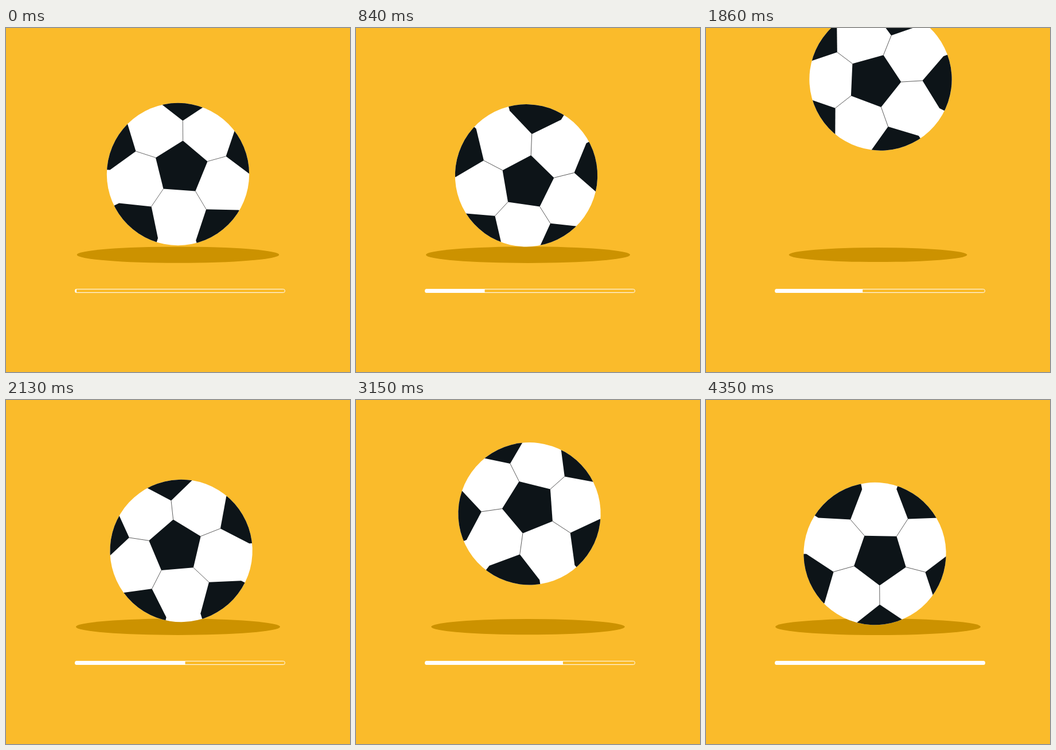
Animation of 600 by 600 pixels, one loop 4380 ms. Source, as an HTML page with a canvas:

```html
<!DOCTYPE html>
<html lang="en">
<head>
<meta charset="utf-8">
<title>Bouncing ball loader</title>
<style>
  html, body { margin: 0; width: 100%; height: 100%; overflow: hidden; background: #fabb2b; }
  canvas { display: block; width: 600px; height: 600px; }
</style>
</head>
<body>
<canvas id="stage" width="600" height="600"></canvas>
<script>
const ctx = document.getElementById('stage').getContext('2d');
const LOOP = 4380, STEP = 30, CYCLE = 1500, TAU = Math.PI * 2;
const GROUND = 276.5, RADIUS = 124.2, PIVOT = 5.7;
const YELLOW = '#fabb2b', SHADE = '#cc9200', BLACK = '#0d1418', WHITE = '#fff';

// Smooth 0..1 ramp that starts at `from` and lasts `span` ms.
function ease(t, from, span) {
  const u = Math.min(1, Math.max(0, (t - from) / span));
  return u * u * (3 - 2 * u);
}

// Height of the ball above the ground: slow take-off, steady fall, two shrinking hops.
const LANDING = 607, FALL_SPEED = 0.771;
const rise = p => 224 / (1 + Math.exp((204 - p) * 0.0097));

function heightAt(t) {
  const p = t % CYCLE;
  if (p < LANDING) return Math.min(rise(p), FALL_SPEED * (LANDING - p));
  let begin = LANDING, half = 128, peak = 44;
  for (let hop = 0; hop < 2; hop++) {
    const u = (p - begin) / half - 1;
    if (u < 1) return peak * (1 - u * u);
    begin += 2 * half;
    half /= 2;
    peak /= 4;
  }
  return rise(p - CYCLE);
}

const spinAt = t => -4.4
  + 183.7 * ease(t, -120, 1300)
  + 131.2 * ease(t, CYCLE - 120, 1100)
  + 154.5 * ease(t, 2 * CYCLE - 120, 1100);

const progressAt = t => [0.3, 0.3, 0.4]
  .reduce((sum, part, i) => sum + part * ease(t, i * CYCLE - 110, 1100), 0);

const core = Array.from({ length: 5 }, (_, i) => {
  const a = (i * 72 + 4.1) * Math.PI / 180;
  return [5.2 + 47.7 * Math.sin(a), -10.9 - 47.7 * Math.cos(a)];
});

// Visible corners of each rim patch: seam corner, then the two beside it.
const patches = [
  [[8.3, -93.2], [-39, -130], [54, -123.5]],
  [[83.6, -31.2], [103.2, -89], [136, 8]],
  [[49.2, 61.3], [105.8, 62.6], [31.3, 115.3]],
  [[-46.4, 56.4], [-35, 111.4], [-102.8, 50.6]],
  [[-73.5, -40], [-118.6, -7.4], [-93.8, -106.5]]
];
const beyond = ([x, y]) => [x * 1.3, y * 1.3];

function fillPoly(pts) {
  ctx.beginPath();
  pts.forEach(([x, y]) => ctx.lineTo(x, y));
  ctx.closePath();
  ctx.fill();
}

function drawBall(y, deg) {
  ctx.save();
  ctx.translate(300, y);
  ctx.rotate(deg * Math.PI / 180);
  ctx.translate(0, PIVOT);
  ctx.beginPath();
  ctx.arc(0, 0, RADIUS, 0, TAU);
  ctx.fillStyle = WHITE;
  ctx.fill();
  ctx.clip();
  ctx.strokeStyle = '#444';
  ctx.lineWidth = 0.8;
  ctx.fillStyle = BLACK;
  fillPoly(core);
  patches.forEach(([tip, a, b], i) => {
    ctx.beginPath();
    ctx.moveTo(...core[i]);
    ctx.lineTo(...tip);
    ctx.stroke();
    fillPoly([tip, a, beyond(a), beyond(b), b]);
  });
  ctx.restore();
}

function drawShadow(height) {
  const rx = 180 - 0.1335 * height;
  ctx.fillStyle = SHADE;
  ctx.beginPath();
  ctx.ellipse(300, 395.6, rx, rx * 0.0803, 0, 0, TAU);
  ctx.fill();
}

function pill(x, y, w, h) {
  const r = h / 2;
  ctx.beginPath();
  ctx.arc(x + r, y + r, r, TAU / 4, TAU * 0.75);
  ctx.arc(x + w - r, y + r, r, -TAU / 4, TAU / 4);
  ctx.closePath();
}

function drawBar(part) {
  ctx.save();
  pill(120, 455, 367, 7);
  ctx.clip();
  ctx.fillStyle = WHITE;
  ctx.fillRect(120, 455, 367 * part, 7);
  ctx.restore();
  ctx.strokeStyle = WHITE;
  ctx.lineWidth = 1;
  pill(120.5, 455.5, 366, 6);
  ctx.stroke();
}

function draw(now) {
  let t = Math.floor((now % LOOP) / STEP) * STEP;
  if (t < 2 * STEP) t = 0; // opening pose is held for two steps
  const height = heightAt(t);
  ctx.fillStyle = YELLOW;
  ctx.fillRect(0, 0, 600, 600);
  drawShadow(height);
  drawBall(GROUND - height, spinAt(t));
  drawBar(progressAt(t));
}

let start;
function tick(now) {
  if (start === undefined) start = now;
  draw(now - start);
  requestAnimationFrame(tick);
}
draw(0);
requestAnimationFrame(tick);
</script>
</body>
</html>
```
